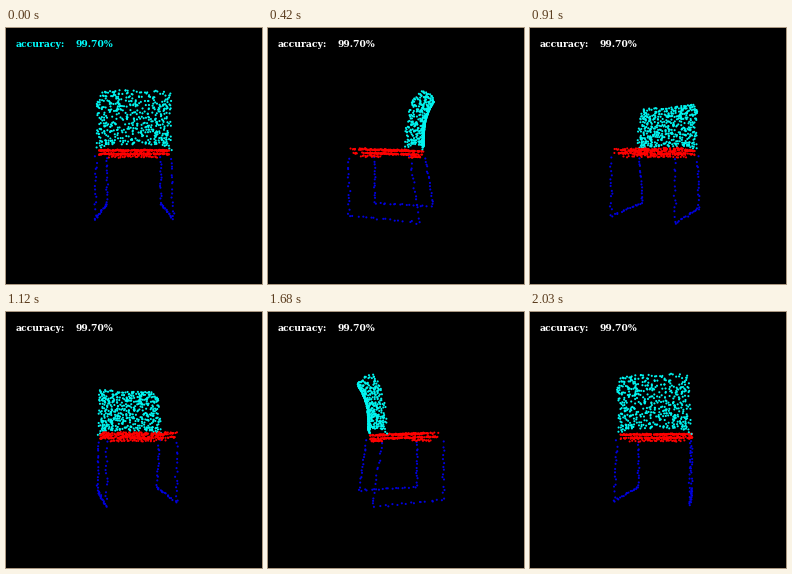
Animation, 256 px wide and 256 px high, one loop 2100 ms. Source, as a matplotlib script:

```python
import numpy as np
import matplotlib.pyplot as plt
from matplotlib.animation import FuncAnimation

SIZE, DPI = 256, 100
FRAMES, INTERVAL = 30, 70
CENTER, CAMERA = 128, 240
PX = 72 / DPI
CYAN, RED, BLUE = (0, 0.96, 0.94), (1, 0, 0), (0, 0, 0.88)

rng = np.random.default_rng(12)


def back_rest(n):
    """Curved shell, bowed sideways and bent backwards at the top."""
    u = rng.uniform(-1, 1, n)
    t = rng.uniform(0, 1, n)
    x = u * (35 - 2 * t)
    top = 56 - 1.5 * u**6
    low = 10 - 6 * u**6
    h = 19 + 11 * t**3 + 7.5 * (1 - u**2)
    return np.column_stack([x, low + (top - low) * t, h])


def seat(n):
    """Thin slab with a top and a bottom sheet, higher at the front."""
    u = rng.uniform(-1, 1, n)
    h = rng.uniform(-36, 22, n)
    slope = (22 - h) / 58
    side = rng.random(n) < 0.2
    x = np.where(side, np.sign(u) * 32, u * 32)
    sheet = rng.integers(0, 2, n) * 3.6 + rng.normal(0, 0.35, n)
    y = 4.8 + 2 * slope - sheet
    return np.column_stack([x, y, h])


def rod(a, b, n, spread=0.5):
    """Points scattered along a thin bar."""
    t = (np.arange(n) + rng.uniform(0.1, 0.9, n))[:, None] / n
    a, b = np.array(a), np.array(b)
    return a + (b - a) * t + rng.normal(0, spread, (n, 3))


def frame_bars():
    bars = []
    for side in (-1, 1):
        front_top, front_foot = (side * 31, -1, -36), (side * 31, -55, -36)
        back_top, back_foot = (side * 34, 0, 23), (side * 34, -55.5, 32)
        bars += [rod(front_top, front_foot, 15),
                 rod(back_top, back_foot, 16),
                 rod(front_foot, back_foot, 17)]
    return np.vstack(bars)


parts = [
    (back_rest(500), CYAN),
    (seat(330), RED),
    (rod((-24, -1, 20), (24, -1, 20), 18), RED),
    (rod((-24, 0, -27), (24, 0, -27), 18), RED),
    (frame_bars(), BLUE),
]
points = np.vstack([p for p, _ in parts])
colors = np.vstack([np.tile(c, (len(p), 1)) for p, c in parts])


def project(angle):
    """Turn around the vertical axis, then apply perspective."""
    x, y, h = points.T
    c, s = np.cos(angle), np.sin(angle)
    depth = x * s - h * c
    scale = CAMERA / (CAMERA + depth)
    px = CENTER + (x * c + h * s) * scale
    py = CENTER - y * scale
    return np.column_stack([px, py]), depth


fig = plt.figure(figsize=(SIZE / DPI, SIZE / DPI), dpi=DPI, facecolor="black")
ax = fig.add_axes([0, 0, 1, 1])
ax.set_xlim(0, SIZE)
ax.set_ylim(SIZE, 0)
ax.axis("off")

cloud = ax.scatter(points[:, 0], points[:, 1], s=(2.1 * PX)**2, marker="o",
                   c=colors, linewidths=0)


def write(x, text):
    return ax.text(x, 19, text, color="white", family="DejaVu Serif",
                   weight="bold", size=9.3 * PX, va="baseline")


labels = [write(9.5, "accuracy:"), write(69, "99.70%")]


def update(i):
    xy, depth = project(2 * np.pi * i / FRAMES)
    order = np.argsort(-depth)
    cloud.set_offsets(xy[order])
    cloud.set_facecolors(colors[order])
    for label in labels:
        label.set_color("cyan" if i == 0 else "white")
    return [cloud, *labels]


anim = FuncAnimation(fig, update, frames=FRAMES, interval=INTERVAL,
                     repeat=True, repeat_delay=0)
plt.show()
```
